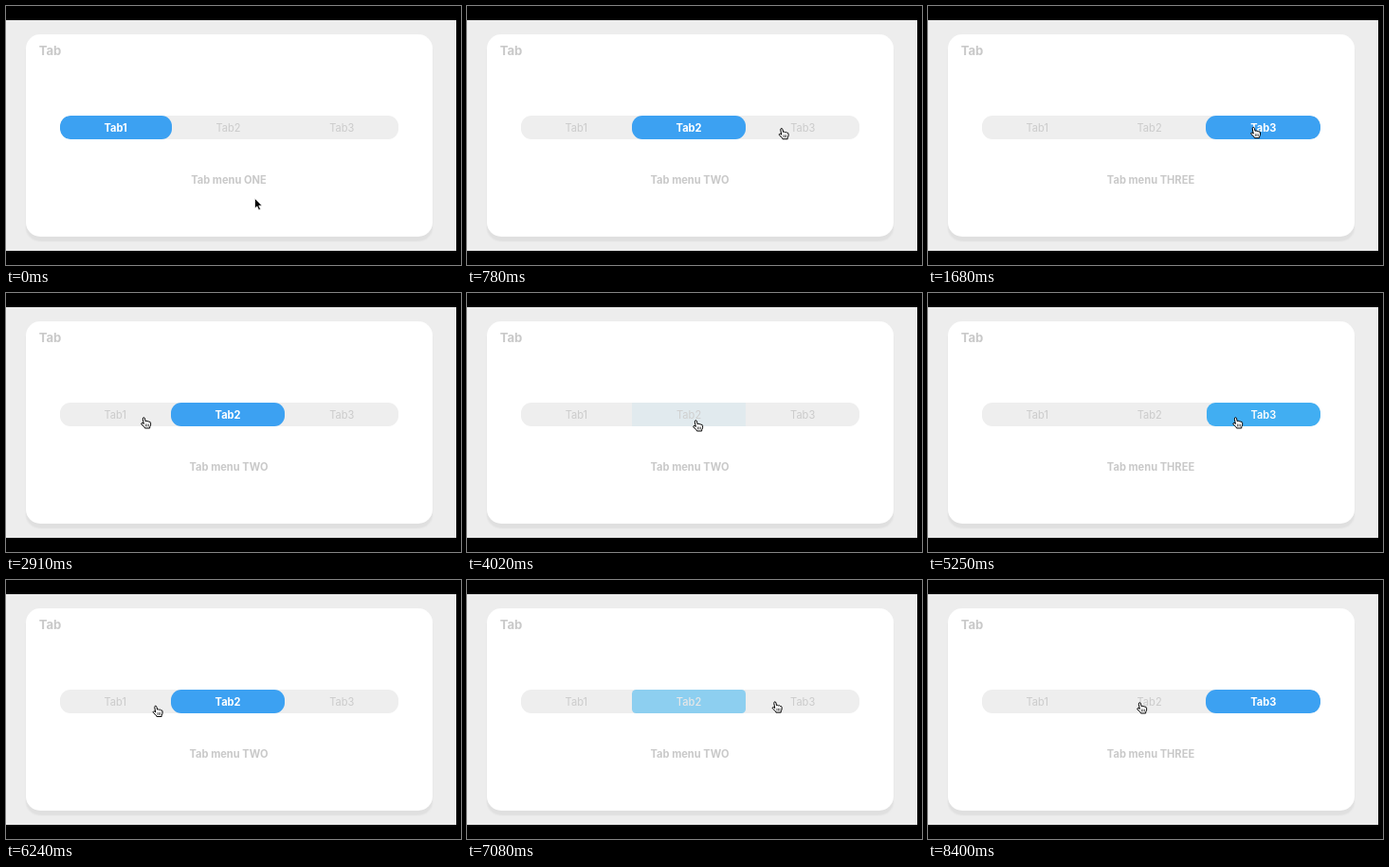
Write an HTML page that moves like this. It is 480 px wide and 274 px high and loops after 8.82 s.

```html
<!DOCTYPE html>
<html lang="en">
<head>
<meta charset="utf-8">
<title>Tab menu</title>
<style>
  html, body { margin: 0; width: 100%; height: 100%; overflow: hidden; background: #000; }
  .stage {
    position: absolute; left: 0; top: 0; width: 480px; height: 274px; overflow: hidden;
    font: 700 11.1px/20px Inter, Roboto, sans-serif; color: #c9c9c9; white-space: nowrap;
  }
  .stage > * { position: absolute; }
  .desk { left: 0; top: 15px; width: 475px; height: 244px; background: #ededed; }
  .card {
    left: 21px; top: 30px; width: 429px; height: 214px;
    border-radius: 15px; background: #fff; box-shadow: 0 5px 2px rgba(0, 0, 0, .06);
  }
  .title { left: 34.7px; top: 37px; font-size: 13.1px; }
  .menu { left: 21px; top: 174px; width: 428px; text-align: center; }
  .bar {
    left: 56.7px; top: 116.2px; width: 357.5px; height: 25px;
    display: flex; overflow: hidden; border-radius: 11px; background: #eee;
  }
  /* each tab is as wide as its label plus an equal share of the rest */
  .bar span {
    flex: 1 1 auto; box-sizing: border-box; height: 25px; padding-top: 2px;
    line-height: 23px; text-align: center;
  }
  svg { left: 0; top: 0; }
</style>
</head>
<body>
<div class="stage">
  <div class="desk"></div>
  <div class="card"></div>
  <div class="title">Tab</div>
  <div class="bar"><span>Tab1</span><span>Tab2</span><span>Tab3</span></div>
  <div class="menu"></div>
  <svg width="480" height="274" viewBox="0 0 480 274">
    <path id="arrow" d="M0 0V10.6L2.4 8.4L4.2 12.4L6 11.6L4.3 7.8H7.6Z"
      fill="#000" stroke="#fff" stroke-width=".7" stroke-linejoin="round"/>
    <g id="hand" stroke="#000" stroke-linejoin="round" stroke-linecap="round">
      <path fill="#fff" d="M3.2 7L2.3 2.2Q2.2 .8 3.3 .7Q4.2 .6 4.5 1.9L5.1 4.6Q6.4 3.8 7 4.8Q8.3 4.2 8.8 5.3Q10.4 4.9 10.6 6.4V8.8L9.7 10.7V12H4.5L3.9 10.6L1 8Q.3 6.9 1.2 6.5Q2 6.2 3.2 7Z"/>
      <path fill="none" stroke-width=".6" d="M5.4 8V10M6.9 8V10M8.4 8V10"/>
    </g>
  </svg>
</div>
<script>
const LOOP = 8820;
const TRAVEL = 270;
const COUNTS = ["ONE", "TWO", "THREE"];
const IDLE = [238, 238, 238], ACTIVE = [60, 161, 242];
const GREY = [203, 203, 203], WHITE = [255, 255, 255];
const BAR_BOTTOM = 141;

// cursor resting places: arrival time, x, y
const STOPS = [
  [0, 258.5, 202.5], [330, 239, 134], [870, 359, 127], [1885, 232, 131],
  [2910, 142, 131], [3660, 238, 134], [4380, 325, 137], [4980, 343, 131],
  [5444, 232, 131], [6330, 128, 133], [6870, 262, 131], [7203, 366, 126],
  [7710, 316, 130], [8400, 220, 129]
];
const CLICKS = [570, 1440, 2340, 3210, 4020, 5130, 5820, 6540, 7020, 7440];

const tabs = [...document.querySelectorAll(".bar span")];
const menu = document.querySelector(".menu");
const hand = document.getElementById("hand");
const arrow = document.getElementById("arrow");

const mix = (a, b, u) => a + (b - a) * u;
const mixAll = (a, b, u) => a.map((v, i) => mix(v, b[i], u));
const rgb = c => `rgb(${c.map(Math.round).join()})`;
function ease(u) {
  u = Math.max(0, Math.min(1, u));
  return u * u * (3 - 2 * u);
}

function cursorAt(t) {
  return STOPS.reduce((p, [arrive, ...stop]) =>
    mixAll(p, stop, ease(1 - (arrive - t) / TRAVEL)), STOPS[0].slice(1));
}

// a click selects the tab under the fingertip
function tabAt(time) {
  return Math.floor((cursorAt(time)[0] + 4 - 56.7) / (357.5 / 3));
}

function drawTabs(t) {
  const click = CLICKS.findLast(c => c <= t);
  const selected = click === undefined ? 0 : tabAt(click);
  const age = click === undefined ? LOOP : t - click + 26;
  const fast = ease(age / 164), slow = ease(age / 200);

  tabs.forEach((tab, i) => {
    const on = i === selected;
    const [r, , b] = mixAll(IDLE, ACTIVE, fast);
    const g = mix(IDLE[1], ACTIVE[1], slow);
    tab.style.background = on ? rgb([r, g, b]) : "none";
    tab.style.borderRadius = on ? 11 * slow + "px" : 0;
    tab.style.color = rgb(on ? mixAll(GREY, WHITE, fast) : GREY);
    tab.style.fontWeight = on ? Math.round(mix(400, 700, slow)) : 400;
  });
  menu.textContent = "Tab menu " + COUNTS[selected];
}

function drawCursor(t) {
  const [x, y] = cursorAt(t);
  const overBar = y + 1 < BAR_BOTTOM;
  hand.style.display = overBar ? "" : "none";
  arrow.style.display = overBar ? "none" : "";
  hand.setAttribute("transform", `translate(${x} ${y})`);
  arrow.setAttribute("transform", `translate(${x + 4} ${y + 1})`);
}

const begin = performance.now();
function frame() {
  const t = (performance.now() - begin) % LOOP;
  drawTabs(t);
  drawCursor(t);
  requestAnimationFrame(frame);
}
frame();
</script>
</body>
</html>
```
